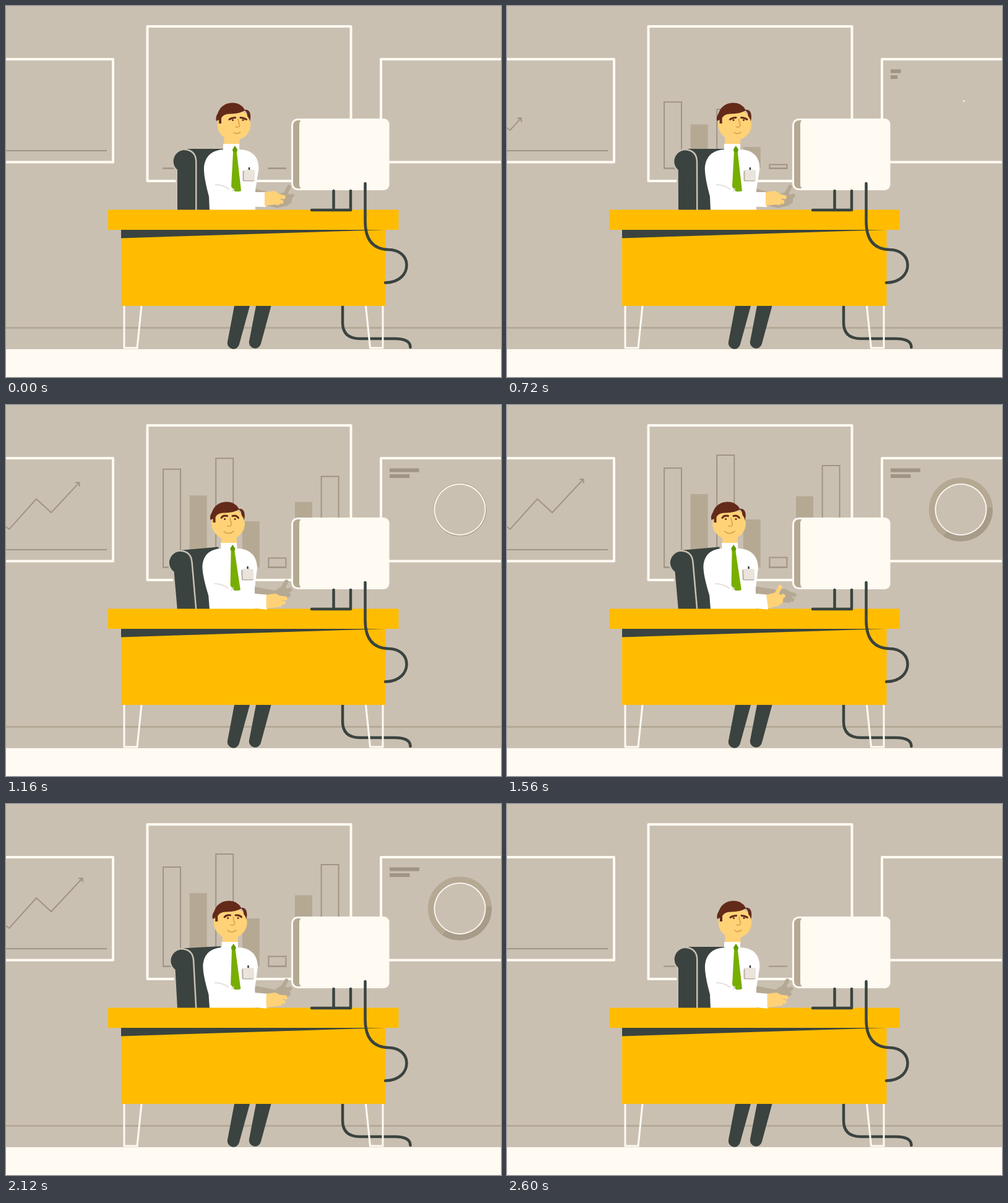
An HTML page that plays this animation: 800x600 px, repeating every 2640 ms.

```html
<!DOCTYPE html>
<html lang="en">
<head>
<meta charset="utf-8">
<title>Office desk</title>
<style>
  html, body { margin: 0; width: 100%; height: 100%; overflow: hidden; background: #cac0b2; }
  svg { display: block; width: 100vw; height: 100vh; }
  .cream { stroke: #fffaf2; fill: none; }
  .dark { fill: #3a433f; }
  .wire { stroke: #3a433f; stroke-width: 4.5; fill: none; stroke-linecap: round; stroke-linejoin: round; }
  .line { stroke: #a09484; stroke-width: 2; fill: none; }
  .tan { fill: #b5a994; stroke: #b5a994; }
  .skin { fill: #ffd277; stroke: #ffd277; }
  .finger { fill: none; stroke-width: 6.5; stroke-linecap: round; }
  .face { fill: none; stroke: #dfa54c; stroke-width: 1.8; stroke-linecap: round; }
  .brow { fill: none; stroke: #642a19; stroke-width: 3; stroke-linecap: round; }
</style>
</head>
<body>
<svg viewBox="0 0 800 600" preserveAspectRatio="none">
  <rect width="800" height="600" fill="#cac0b2"/>
  <path d="M0 520.5H800" stroke="#b5a997" stroke-width="3"/>
  <rect y="555" width="800" height="45" fill="#fffaf2"/>
  <g class="cream" stroke-width="4" stroke-linejoin="round">
    <rect x="228.5" y="33" width="329" height="250"/>
    <rect x="-60" y="86" width="233" height="166.5"/>
    <rect x="606" y="86" width="260" height="166.5"/>
  </g>
  <path class="line" d="M0 234H163M253 262.5H283M338 262.5H368M423 262.5H453M508.500 262.5H538.500"/>

  <g id="charts">
    <g id="bars"></g>
    <path id="trend" class="line"/>
    <path id="arrow" class="line" d="M-4.500 -4.500L0 0L-4.500 4.500"/>
    <rect id="label1" x="620" y="102.500" height="6" fill="#a09484"/>
    <rect id="label2" x="620" y="112" height="6" fill="#a09484"/>
    <path id="ring" fill="none" stroke="#b5a994"/>
    <path id="slice" fill="none" stroke="#a79b89"/>
    <path id="circle" class="cream" stroke-width="1.8"/>
  </g>

  <g id="chair" class="dark">
    <path d="M292 231H352V345H300V250Z"/>
    <path d="M277 345V265A18.200 18.200 0 0 1 287 233Q306 234 306 252V345Z" stroke="#cac0b2" stroke-width="5" paint-order="stroke"/>
  </g>
  <g id="backArm" class="tan"></g>
  <g id="neck"><path class="skin" stroke="none" d="M353 205H377V226H353Z"/></g>
  <g id="torso">
    <path fill="#fff" d="M351 223H377V232Q408 233 408.500 263L403 298V331H329L328 308Q319 275 320 260Q323 234 351 232Z"/>
    <path fill="#77ae00" d="M367 237L366 232L370 226L374 232L373 237L380 299Q376 301 370 300L364 292Z"/>
    <path fill="#4f8a00" d="M366 232L370 226L374 232L372 236H368Z" opacity=".5"/>
    <rect x="382.500" y="266" width="19" height="17.500" rx="2" fill="#b9ada0"/>
    <rect x="384.500" y="265" width="17.500" height="17" rx="1.500" fill="#eae4dc"/>
    <path d="M393 261V265" stroke="#3a433f" stroke-width="2.500"/>
    <path d="M338 289Q352 289 361 297M365 300L369 295" fill="none" stroke="#dfd9d0" stroke-width="1.500"/>
  </g>
  <g id="head">
    <ellipse class="skin" stroke="none" cx="368.500" cy="192" rx="26.500" ry="25"/>
    <path fill="#642a19" d="M344 190H348V181Q352 174 362 174.500Q378 174 386 169Q390 172 390 178Q394 183 394 187Q396.500 178 394 172Q391 167 386 168Q380 156.500 366 156.500Q348 157 342 174Q338 180 340 186L344 184Z"/>
    <g id="face">
      <g fill="#642a19"><circle cx="366.500" cy="184.500" r="1.500"/><circle cx="383" cy="184.500" r="1.500"/></g>
      <path id="brows" class="brow"/>
      <path class="face" d="M375 183L377.500 193.500Q376 197 371 195.500"/>
      <path id="mouth" class="face"/>
    </g>
  </g>

  <rect x="462.500" y="183.500" width="60" height="113" rx="9" fill="#b5a994" stroke="#fffaf2" stroke-width="3"/>
  <rect x="474" y="182" width="145.500" height="116" rx="9" fill="#fffaf2"/>

  <g class="dark">
    <path d="M369 485H394L377 547A9.700 9.700 0 0 1 358 543Z"/>
    <path d="M404 485H428.500L412 546A9.700 9.700 0 0 1 393 542Z"/>
  </g>
  <path class="wire" d="M544 485V512Q544 538 572 538H628Q653.500 538 653.500 552"/>
  <path fill="#ffbc00" d="M165 329.500H634.500V362H613.500V485H186V362H165Z"/>
  <path class="dark" d="M186 362H612L186 375.500Z"/>
  <path class="cream" stroke-width="3" d="M191 485V553H212L219 485M581.500 485L588.500 553H609V485"/>
  <path class="wire" d="M529.500 299V330M557 299V330H494"/>
  <path class="wire" d="M580.500 287V348Q580.500 393 618 394C636 394 647.500 405 647.500 419S636 447.500 613 447.500"/>
  <g id="frontArm" class="skin"></g>
</svg>
<script>
const LOOP = 2640, STEP = 40, BASE = 262.5;
const $ = id => document.getElementById(id);
const set = (id, attrs) => { for (const k in attrs) $(id).setAttribute(k, attrs[k]); };
const clamp = x => Math.min(1, Math.max(0, x));
const mix = (a, b, p) => a + (b - a) * p;
const smooth = x => (x = clamp(x), x * x * (3 - 2 * x));

// Same curve as cubic-bezier(.55, 0, .37, 1)
function ease(t, start, duration) {
  const x = clamp((t - start) / duration);
  let lo = 0, hi = 1;
  for (let i = 0; i < 24; i++) {
    const v = (lo + hi) / 2, u = 1 - v;
    if (3 * u * u * v * .55 + 3 * u * v * v * .37 + v * v * v < x) lo = v; else hi = v;
  }
  return smooth(lo);
}

function arc(r, from, to) {
  const at = deg => {
    const a = deg * Math.PI / 180;
    return `${733.5 + r * Math.cos(a)} ${169 + r * Math.sin(a)}`;
  };
  const mid = (from + to) / 2;
  return `M${at(from)}A${r} ${r} 0 0 1 ${at(mid)}A${r} ${r} 0 0 1 ${at(to)}`;
}

const barHeights = [160.5, 118.5, 181.5, 77.5, 16, 115, 164.5];
$('bars').innerHTML = barHeights.map((_, i) =>
  `<path id="bar${i}" ${i % 2 || i === 5 ? 'fill="#b5a994"' : 'class="line"'}/>`).join('');

function drawBars(t) {
  barHeights.forEach((height, i) => {
    const h = height * ease(t, 40 + i * 40, 1250), x = 254 + i * 42.6;
    set('bar' + i, { d: `M${x} ${BASE}V${BASE - h}h28V${BASE}Z` });
  });
}

const trendPoints = [[-126, 96], [5, 201], [49, 152], [73, 174], [123.5, 120]];
const trendLengths = trendPoints.slice(1).map((p, i) =>
  Math.hypot(p[0] - trendPoints[i][0], p[1] - trendPoints[i][1]));
const trendTotal = trendLengths.reduce((a, b) => a + b);

function drawTrend(t) {
  let left = trendTotal * ease(t, 95, 1250), d = 'M' + trendPoints[0];
  for (let i = 0; i < trendLengths.length; i++) {
    const [x0, y0] = trendPoints[i], [x1, y1] = trendPoints[i + 1];
    const p = Math.min(1, left / trendLengths[i]);
    const x = mix(x0, x1, p), y = mix(y0, y1, p);
    d += `L${x} ${y}`;
    const angle = Math.atan2(y1 - y0, x1 - x0) * 180 / Math.PI;
    set('arrow', { transform: `translate(${x} ${y}) rotate(${angle})` });
    left -= trendLengths[i];
    if (left <= 0) break;
  }
  set('trend', { d });
}

function drawDonut(t) {
  const label = ease(t, 358, 895);
  set('label1', { width: 48 * label });
  set('label2', { width: 32.5 * label });
  const r = 41 * ease(t, 397, 763), sweep = 359.9 * ease(t, 640, 540);
  set('circle', { d: sweep > .1 ? arc(r, -78, -78 + sweep) : '' });
  const width = 10.5 * ease(t, 1000, 485), ringRadius = 41 + width / 2;
  set('ring', { d: width ? arc(ringRadius, 0, 359.9) : '', 'stroke-width': width });
  set('slice', { d: width ? arc(ringRadius, -4, 123) : '', 'stroke-width': width });
}

// Typing cycle: six poses, the back arm runs half a cycle away from the front one
const typing = {
  lift: [1, 1, .7, 0, 0, 0],
  wrist: [0, -12, -25, -8, 0, 0],
  index: [14, -10, -35, -54, -25, 6],
  middle: [20, 5, -10, -24, -8, 8]
};

function arm(pose, sleeve) {
  const finger = (x, y, length, angle) =>
    `<path class="finger" d="M${x} ${y}h${length}" transform="rotate(${angle} ${x} ${y})"/>`;
  const drop = 1 - typing.lift[pose];
  return `<g transform="translate(${3 * drop} 0) rotate(${4.5 * drop} 345 310)">${sleeve}
    <g transform="translate(420 312) rotate(${typing.wrist[pose] - 4.5 * drop})">
    <path stroke="none" d="M-2 -11L13 -13Q23 -10 24 -1Q23 8 12 9.500L-2 11Z"/>
    ${finger(12, -7, 17, typing.index[pose])}${finger(12, 0, 14, typing.middle[pose])}
    ${finger(10, 5, 10, typing.middle[pose] / 2)}</g></g>`;
}

function drawArms(t) {
  const pose = Math.floor(t / STEP) % 6;
  $('frontArm').innerHTML = arm(pose,
    '<path fill="#fff" stroke="none" d="M345 299L400 301H420V325L400 324.500L345 318Z"/>');
  $('backArm').innerHTML = '<g transform="translate(16 -2)">' + arm((pose + 3) % 6,
    '<path stroke="none" d="M355 290L385 295L421 301V323L355 312Z"/>') + '</g>';
}

function drawMan(t) {
  const lean = smooth((t - 660) / 520) - smooth((t - 1840) / 660);
  const k = .037 * lean;
  set('chair', { transform: `rotate(${-5 * lean} 330 330)` });
  set('torso', { transform: `matrix(1 0 ${k} 1 ${-330 * k} 0)` });
  set('neck', { transform: `translate(${-4.7 * lean} 0)` });
  set('head', { transform: `translate(${-9.5 * lean} 0)` });
  set('face', { transform: `translate(${-3.5 * lean} 0)` });
  const inner = mix(180.5, 179.5, lean), bend = mix(181, 177.5, lean), outer = mix(183.5, 182.5, lean);
  set('brows', { d: `M361 ${outer}Q364 ${bend} 370.5 ${inner}M379 ${inner}Q385 ${bend} 388.5 ${outer}` });
  set('mouth', { d: `M${mix(368, 365, lean)} 204.5Q373 ${mix(208.5, 211, lean)} ${mix(378.5, 381, lean)} 204` });
}

function draw() {
  const t = Math.floor(performance.now() % LOOP / STEP) * STEP;
  drawBars(t);
  drawTrend(t);
  drawDonut(t);
  set('charts', { opacity: 1 - clamp((t - 2240) / 360) });
  drawArms(t);
  drawMan(t);
  requestAnimationFrame(draw);
}
draw();
</script>
</body>
</html>
```
